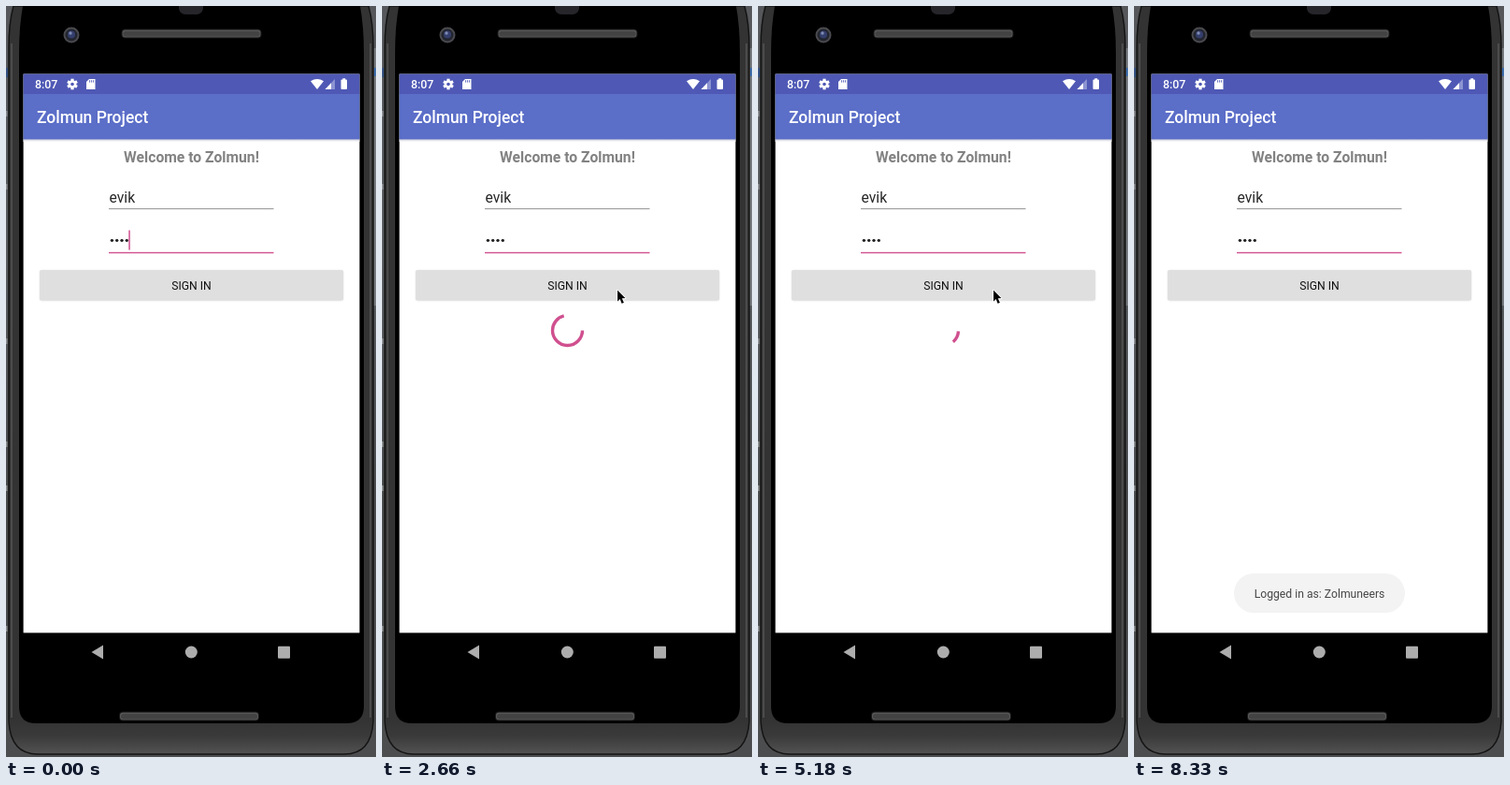
Recreate the animation shown at these times as an HTML page with a canvas. Size 396 px wide and 802 px high, loop 8.4 s.

```html
<!DOCTYPE html>
<html lang="en">
<head>
<meta charset="utf-8">
<title>Sign in</title>
<style>
html, body { margin: 0; width: 100%; height: 100%; overflow: hidden; background: #000; }
canvas { display: block; width: 100vw; height: 100vh; }
</style>
</head>
<body>
<canvas id="stage"></canvas>
<script>
const W = 396, H = 802, LOOP = 8400, STEP = 70;
const PINK = '#d0508f', MID = 198.5;
const canvas = document.getElementById('stage');
const ctx = canvas.getContext('2d');
const ratio = window.devicePixelRatio || 1;
canvas.width = W * ratio;
canvas.height = H * ratio;

const clamp = v => Math.max(0, Math.min(1, v));
const lerp = (a, b, p) => a + (b - a) * p;
const ramp = (t, from, to) => clamp((t - from) / (to - from));
const smooth = p => p * p * (3 - 2 * p);

function rect(x, y, w, h, fill) {
  ctx.fillStyle = fill;
  ctx.fillRect(x, y, w, h);
}

function round(x, y, w, h, r, fill) {
  ctx.beginPath();
  ctx.roundRect(x, y, w, h, r);
  ctx.fillStyle = fill;
  ctx.fill();
}

function disc(x, y, r, fill) {
  ctx.beginPath();
  ctx.arc(x, y, r, 0, Math.PI * 2);
  ctx.fillStyle = fill;
  ctx.fill();
}

function poly(points, fill) {
  ctx.beginPath();
  points.forEach(([x, y]) => ctx.lineTo(x, y));
  ctx.closePath();
  ctx.fillStyle = fill;
  ctx.fill();
}

function text(str, x, y, size, weight, fill, align = 'left') {
  ctx.font = `${weight} ${size}px Roboto, sans-serif`;
  ctx.textAlign = align;
  ctx.fillStyle = fill;
  ctx.fillText(str, x, y);
}

function gradient(x0, y0, x1, y1, ...colors) {
  const g = ctx.createLinearGradient(x0, y0, x1, y1);
  colors.forEach((c, i) => g.addColorStop(i / (colors.length - 1), c));
  return g;
}

function speaker(x, y) {
  round(x, y, 150, 10, 4, '#191919');
  round(x + 1, y + 1, 148, 8, 3, '#575757');
  round(x + 2, y + 2.5, 146, 5.5, 2.5, '#434343');
}

function drawPhone() {
  rect(0, 0, W, H, gradient(0, 0, 0, H, '#55575a', '#5a5d60', '#47494b', '#4c4d4f'));
  rect(393, 45, 3, 275, '#75787b');
  rect(0, 66, 2, 10, '#33507e');
  rect(394, 66, 2, 9, '#3c6ca8');
  for (const y of [112, 190, 355, 465, 512, 662]) rect(0, y, 1.5, 6, '#8a8c8e');

  // body with its rim
  ctx.beginPath();
  ctx.moveTo(8, 0);
  ctx.quadraticCurveTo(3, 18, 3, 44);
  ctx.lineTo(3, 764);
  ctx.quadraticCurveTo(5, 799, 34, 799);
  ctx.lineTo(362, 799);
  ctx.quadraticCurveTo(391, 799, 393, 764);
  ctx.lineTo(393, 44);
  ctx.quadraticCurveTo(393, 18, 388, 0);
  ctx.closePath();
  ctx.fillStyle = gradient(0, 762, 0, 797, '#333', '#3a3a3a', '#505050');
  ctx.fill();
  ctx.strokeStyle = '#141414';
  ctx.lineWidth = 1.5;
  ctx.stroke();
  rect(5, 40, 2, 720, '#4c4c4c');
  rect(389, 40, 2, 720, '#4c4c4c');

  // front glass
  ctx.beginPath();
  ctx.moveTo(18, 0);
  ctx.quadraticCurveTo(14, 22, 14, 50);
  ctx.lineTo(14, 748);
  ctx.quadraticCurveTo(14, 766, 32, 766);
  ctx.lineTo(364, 766);
  ctx.quadraticCurveTo(383, 766, 383, 748);
  ctx.lineTo(383, 50);
  ctx.quadraticCurveTo(383, 22, 379, 0);
  ctx.closePath();
  ctx.fillStyle = '#000';
  ctx.fill();

  round(185, -8, 26, 17, 7, '#25252a');
  speaker(123.5, 24.5);
  speaker(121, 753.5);
  disc(70, 31, 8.5, '#4a4a4e');
  disc(70, 31, 6.5, '#23252f');
  disc(70, 30.5, 4, '#343e6c');
  disc(69, 29, 1.7, '#7f8bb5');
}

function drawStatusIcons() {
  text('8:07', 31, 88.3, 12.4, 500, '#fff');

  ctx.save();
  ctx.translate(71, 83.5);
  for (let i = 0; i < 6; i++) {
    rect(-1.6, -5.8, 3.2, 4, '#fff');
    ctx.rotate(Math.PI / 3);
  }
  disc(0, 0, 4.3, '#fff');
  disc(0, 0, 1.8, '#4f59b5');
  ctx.restore();

  poly([[89, 78], [95.5, 78], [95.5, 89], [86, 89], [86, 81]], '#fff');
  for (const x of [89.2, 91.2, 93.2]) rect(x, 79.2, 0.9, 2.4, '#4f59b5');

  ctx.beginPath();
  ctx.moveTo(333, 89);
  ctx.lineTo(326, 80.3);
  ctx.quadraticCurveTo(333, 75.5, 340, 80.3);
  ctx.closePath();
  ctx.fillStyle = '#fff';
  ctx.fill();

  poly([[341.5, 89], [352, 89], [352, 78]], '#8d95d2');
  poly([[341.5, 89], [348, 89], [348, 82.2]], '#fff');
  round(358.5, 78.5, 6.5, 10.5, 1, '#fff');
  rect(360.3, 77.3, 2.9, 1.6, '#fff');
}

function drawApp() {
  rect(18.6, 72.6, 359.8, 596.8, '#fff');
  rect(18.6, 142, 359.8, 3, gradient(0, 142, 0, 145, '#c6c8d6', '#fff'));
  rect(18.6, 72.6, 359.8, 21.4, '#4f59b5');
  rect(18.6, 94, 359.8, 48.4, '#5b6ec8');
  drawStatusIcons();
  text('Zolmun Project', 33, 125.2, 17.46, 500, '#fff');
  text('Welcome to Zolmun!', MID, 166.5, 15.7, 700, '#828282', 'center');
  text('evik', 110.5, 210, 15.7, 400, '#262626');
  rect(110, 216.2, 176.5, 0.9, '#868686');
  for (let i = 0; i < 4; i++) disc(113.4 + i * 5.3, 250.3, 1.65, '#222');
  rect(110, 262.8, 176.5, 1.4, PINK);

  const grey = '#adadad';
  poly([[91.5, 690], [104, 682.5], [104, 697.5]], grey);
  disc(198.3, 690, 6.5, grey);
  round(291, 683.7, 13, 13, 1, grey);
}

function drawCaret(t) {
  const flips = [550, 1030, 1530, 2030, 2600, 3150, 3700, 4250, 4800, 5300, 5850, 6370, 6860, 7350, 7840];
  const hidden = flips.filter(f => f <= t).length % 2;
  // the press brings the caret back early
  if (!hidden || (t >= 1960 && t < 2030)) rect(131.3, 239.5, 1.5, 21, PINK);
}

function drawButton(t) {
  const lift = ramp(t, 1960, 2100) * (1 - ramp(t, 2310, 2520));
  ctx.save();
  ctx.shadowColor = `rgba(0,0,0,${0.2 + 0.15 * lift})`;
  ctx.shadowBlur = (1.5 + 2.5 * lift) * ratio;
  ctx.shadowOffsetY = 0.6 * ratio;
  round(36, 282, 325, 32, 2, '#dfdfdf');
  ctx.restore();

  if (t >= 1960 && t < 2520) {
    const p = ramp(t, 1960, 2260);
    const fade = 1 - ramp(t, 2310, 2520);
    ctx.save();
    ctx.beginPath();
    ctx.roundRect(36, 282, 325, 32, 2);
    ctx.clip();
    disc(lerp(251, MID, p ** 4), lerp(304, 298, p), 166 * p, `rgba(0,0,0,${0.09 * fade})`);
    ctx.restore();
  }
  text('SIGN IN', MID, 302.6, 12.2, 400, '#111', 'center');
}

// eased value at x of a cubic whose control points have heights 0, 0, 1, 1
function curve(x, x0, x1, x2, x3) {
  if (x <= x0) return 0;
  if (x >= x3) return 1;
  let lo = 0, hi = 1;
  for (let i = 0; i < 20; i++) {
    const u = (lo + hi) / 2, v = 1 - u;
    const cx = x0 * v ** 3 + 3 * x1 * u * v * v + 3 * x2 * u * u * v + x3 * u ** 3;
    if (cx < x) lo = u; else hi = u;
  }
  return smooth(lo);
}

function drawSpinner(t) {
  if (t < 2240 || t >= 5320) return;
  const turns = (t - 2201) / 1419;
  const phase = turns % 1;
  const head = 0.75 * curve(phase, 0, 0.2, 0.1, 0.5) + 0.03;
  const tail = 0.75 * curve(phase, 0.5, 0.7, 0.6, 1);
  const base = 0.25 * phase + turns * 0.6 - 0.275;
  const full = Math.PI * 2;
  ctx.beginPath();
  ctx.arc(MID, 346.5, 16, (base + tail) * full, (base + head) * full);
  ctx.strokeStyle = PINK;
  ctx.lineWidth = 3.4;
  ctx.stroke();
}

function drawToast(t) {
  const alpha = ramp(t, 5250, 5460);
  if (!alpha) return;
  ctx.save();
  ctx.globalAlpha = alpha;
  round(107, 606, 183, 42, 21, '#f3f3f3');
  text('Logged in as: Zolmuneers', MID, 631.7, 12.2, 400, '#464646', 'center');
  ctx.restore();
}

// time, x, y
const route = [
  [280, 400, 400], [770, 262, 270], [910, 262, 270], [1120, 251.5, 303],
  [5600, 251.5, 303], [5950, 248.5, 600], [6790, 248.5, 600], [7420, 250, 806]
];

function drawPointer(t) {
  if (t < route[0][0] || t > route[route.length - 1][0]) return;
  const i = Math.max(1, route.findIndex(stop => stop[0] >= t));
  const [t0, x0, y0] = route[i - 1], [t1, x1, y1] = route[i];
  const p = smooth(ramp(t, t0, t1));

  if ((t >= 1120 && t < 1330) || (t >= 1960 && t < 2310)) {
    ctx.beginPath();
    ctx.arc(251, 304, 21.7, 0, Math.PI * 2);
    ctx.strokeStyle = '#111';
    ctx.lineWidth = 1.4;
    ctx.stroke();
  }

  ctx.save();
  ctx.translate(lerp(x0, x1, p), lerp(y0, y1, p));
  ctx.scale(0.92, 0.92);
  const arrow = [[0.6, 0.6], [0.6, 13.6], [3.5, 10.9], [5.6, 16], [8, 15], [5.8, 10.1], [9.7, 9.9]];
  poly(arrow, '#000');
  ctx.strokeStyle = '#fff';
  ctx.lineWidth = 2;
  ctx.lineJoin = 'round';
  ctx.stroke();
  poly(arrow, '#000');
  ctx.restore();
}

function frame(now) {
  const t = Math.floor((now % LOOP) / STEP) * STEP;
  ctx.setTransform(ratio, 0, 0, ratio, 0, 0);
  drawPhone();
  drawApp();
  drawCaret(t);
  drawButton(t);
  drawSpinner(t);
  drawToast(t);
  drawPointer(t);
  requestAnimationFrame(frame);
}

frame(performance.now());
</script>
</body>
</html>
```
